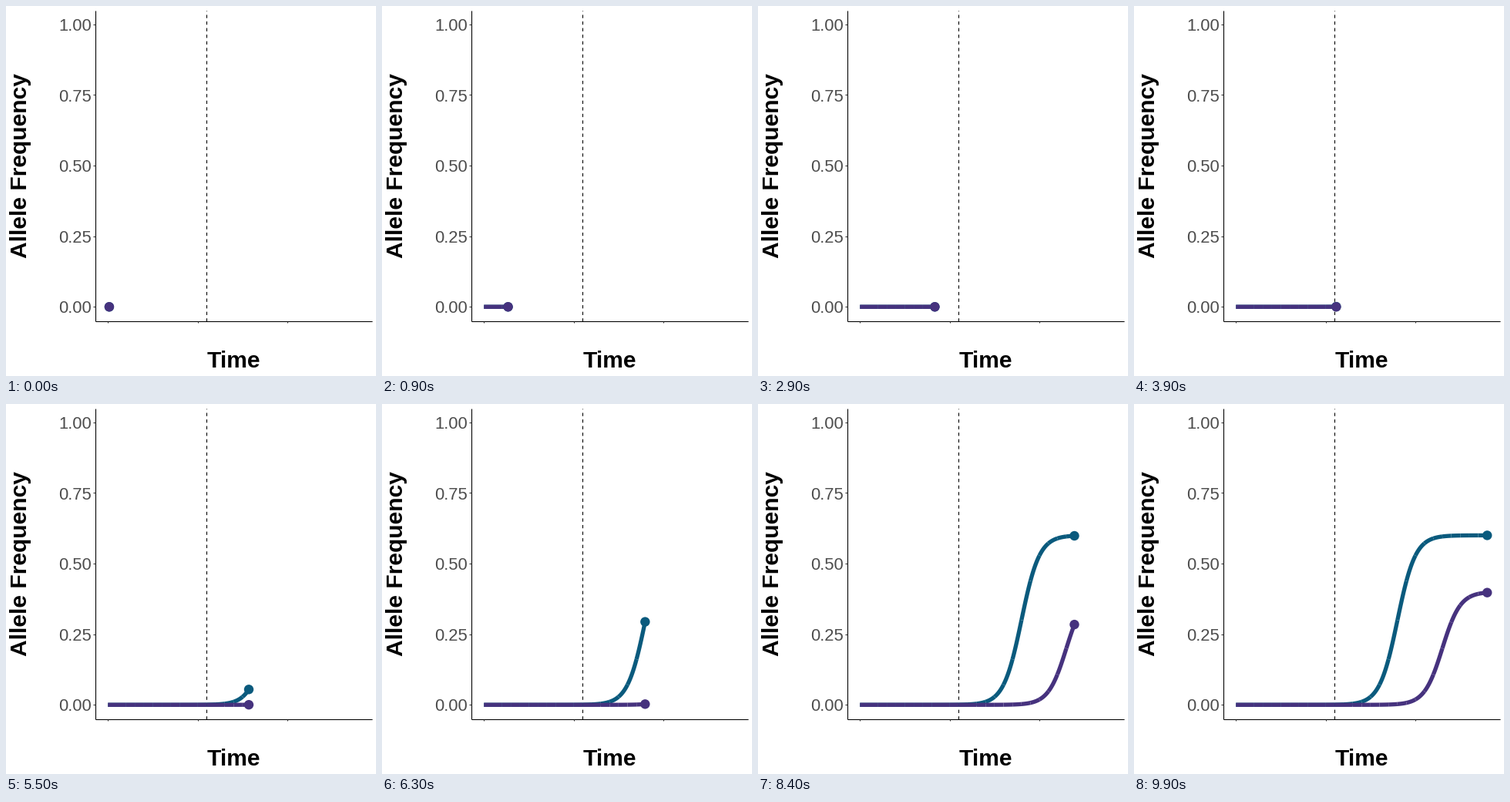
Animation, 480 px wide and 480 px high, one loop 10 s. Source, as a matplotlib script:

```python
import numpy as np
import matplotlib.pyplot as plt
from matplotlib.animation import FuncAnimation
from matplotlib.collections import LineCollection
from matplotlib.patches import Circle

SIZE, DPI = 480, 72
FRAMES, INTERVAL = 100, 100
LEFT, RIGHT, TOP, BOTTOM = 116, 474.5, 5.5, 408.6
T_MAX, STEP, ONSET = 280, 10, 110
RATE = 0.1
FONT = "Liberation Sans"

# colour, plateau, midpoint
ALLELES = [("#0a5a7d", 0.6, 180), ("#46327e", 0.4, 230)]


def px(t):
    pad = (RIGHT - LEFT) / 22
    return LEFT + pad + np.asarray(t) / T_MAX * (RIGHT - LEFT - 2 * pad)


def py(v):
    pad = (BOTTOM - TOP) / 22
    return BOTTOM - pad - np.asarray(v) * (BOTTOM - TOP - 2 * pad)


def logistic(t, plateau, mid):
    return plateau / (1 + np.exp(-RATE * (t - mid)))


def pieces(t_end, plateau, mid):
    """Curve up to t_end, cut into butt-ended pieces of STEP."""
    out = []
    for start in np.arange(0, t_end, STEP):
        t = np.linspace(start, min(start + STEP, t_end), 12)
        out.append(np.column_stack([px(t), py(logistic(t, plateau, mid))]))
    return out


fig = plt.figure(figsize=(SIZE / DPI, SIZE / DPI), dpi=DPI, facecolor="white")
ax = fig.add_axes([0, 0, 1, 1])
ax.set_xlim(0, SIZE)
ax.set_ylim(SIZE, 0)
ax.axis("off")


def rule(xs, ys, color="black", **kw):
    ax.plot(xs, ys, color=color, lw=1.07, solid_capstyle="butt",
            dash_capstyle="butt", zorder=1, **kw)


rule([LEFT, LEFT], [BOTTOM + 0.5, TOP])
rule([LEFT - 0.5, RIGHT], [BOTTOM, BOTTOM])
rule([px(ONSET)] * 2, [BOTTOM, TOP], dashes=(4, 4))

for v in np.linspace(0, 1, 5):
    y = py(v)
    rule([LEFT - 2.75, LEFT], [y, y], "#333333")
    ax.text(LEFT - 5, y + 8.2, f"{v:.2f}", family=FONT, size=22,
            color="#4d4d4d", ha="right", va="baseline")
for t in (0, 100, 200):
    rule([px(t)] * 2, [BOTTOM, BOTTOM + 2.75], "#333333")

title = dict(family=FONT, size=30, weight="bold", color="black",
             ha="center", va="baseline")
ax.text((LEFT + RIGHT) / 2, 469, "Time", **title)
ax.text(27, (TOP + BOTTOM) / 2 + 0.5, "Allele Frequency", rotation=90,
        rotation_mode="anchor", **title)

trails, dots = [], []
for i, (color, *_) in enumerate(ALLELES):
    trail = LineCollection([], colors=color, linewidths=5.33,
                           capstyle="butt", zorder=2 + i)
    trail.set_snap(False)
    trails.append(ax.add_collection(trail, autolim=False))
    dots.append(ax.add_patch(Circle((0, 0), 6.2, fc=color, lw=0, zorder=4 + i)))


def update(i):
    t = min(T_MAX, (i + 0.5) * T_MAX / (FRAMES - 1))
    for (_, plateau, mid), trail, dot in zip(ALLELES, trails, dots):
        trail.set_segments(pieces(t, plateau, mid))
        dot.center = float(px(t)), float(py(logistic(t, plateau, mid)))
    return trails + dots


anim = FuncAnimation(fig, update, frames=FRAMES, interval=INTERVAL,
                     repeat=True, repeat_delay=0)
plt.show()
```
